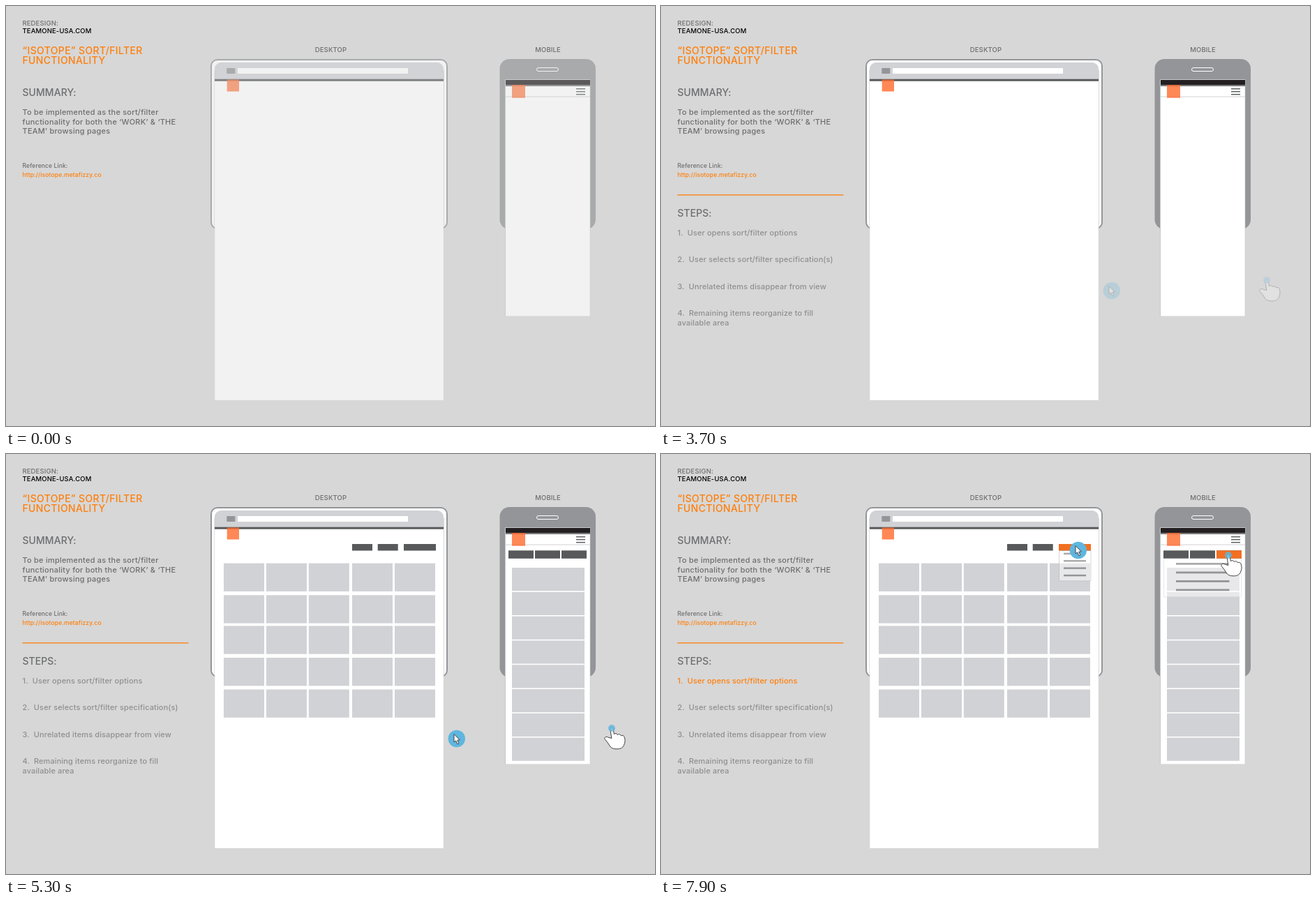
Animation, 930 px wide and 602 px high, one loop 8 s. Source, as an HTML page with a canvas:

```html
<!DOCTYPE html>
<html lang="en">
<head>
<meta charset="utf-8">
<title>Sort/filter functionality</title>
<style>
  html, body { margin: 0; width: 100%; height: 100%; overflow: hidden; background: #d7d7d7; }
  canvas, svg { position: absolute; left: 0; top: 0; width: 930px; height: 602px; }
  text { font: 500 11px Inter, sans-serif; fill: #6d6e70; white-space: pre; }
  .label { font-size: 9.5px; letter-spacing: .12px; }
  .head { font-size: 14px; letter-spacing: .05px; }
  .title { letter-spacing: .35px; }
  .body { letter-spacing: .22px; }
  .link { font-size: 8.6px; letter-spacing: .08px; }
  .orange { fill: #ff7f0a; }
  .black { fill: #000; }
  .mid { text-anchor: middle; }
  #steps text { fill: #8f8f90; letter-spacing: .12px; }
</style>
</head>
<body>
<canvas id="stage" width="930" height="602"></canvas>
<svg viewBox="0 0 930 602">
  <text class="label" x="23.5" y="28.3">REDESIGN:</text>
  <text class="label black" x="23.5" y="39">TEAMONE-USA.COM</text>
  <text class="head title orange" x="23.5" y="69">“ISOTOPE” SORT/FILTER</text>
  <text class="head title orange" x="23.5" y="82.7">FUNCTIONALITY</text>
  <text class="head" x="23.5" y="128.7">SUMMARY:</text>
  <text class="body" x="23.5" y="155.8">To be implemented as the sort/filter</text>
  <text class="body" x="23.5" y="169.5">functionality for both the ‘WORK’ &amp; ‘THE</text>
  <text class="body" x="23.5" y="183.2">TEAM’ browsing pages</text>
  <text class="link" x="23.5" y="231.5">Reference Link:</text>
  <text class="link orange" x="23.5" y="245">http://isotope.metafizzy.co</text>
  <text class="label mid" x="465.5" y="66">DESKTOP</text>
  <text class="label mid" x="776.5" y="66">MOBILE</text>
  <text class="head" id="stepsHead" x="23.5" y="301.7">STEPS:</text>
  <g id="steps">
    <text id="stepOne" x="23.5" y="329">1.  User opens sort/filter options</text>
    <text x="23.5" y="367.3">2.  User selects sort/filter specification(s)</text>
    <text x="23.5" y="406">3.  Unrelated items disappear from view</text>
    <text x="23.5" y="444.2">4.  Remaining items reorganize to fill</text>
    <text x="23.5" y="457.7">available area</text>
  </g>
</svg>
<script>
const W = 930, H = 602, LOOP = 8000;
const GREY = '#939598', LIGHT = '#d1d2d6', DARK = '#58595b', BLUE = '#5fb6de', ORANGE = '#f36f21';
const ctx = document.getElementById('stage').getContext('2d');
const byId = id => document.getElementById(id);

function layer(draw) {
  const canvas = document.createElement('canvas');
  canvas.width = W;
  canvas.height = H;
  draw(canvas.getContext('2d'));
  return canvas;
}

function box(c, color, x, y, w, h) {
  c.fillStyle = color;
  c.fillRect(x, y, w, h);
}

function rounded(c, x, y, w, h, r, fill, stroke, width = 1) {
  c.beginPath();
  c.roundRect(x, y, w, h, r);
  if (fill) { c.fillStyle = fill; c.fill(); }
  if (stroke) { c.strokeStyle = stroke; c.lineWidth = width; c.stroke(); }
}

function outlined(c, path) {
  const shape = new Path2D(path);
  c.lineJoin = 'round';
  c.lineWidth = 1;
  c.fillStyle = '#fff';
  c.strokeStyle = '#414042';
  c.fill(shape);
  c.stroke(shape);
}

function disc(c, x, y, r) {
  c.fillStyle = BLUE;
  c.beginPath();
  c.arc(x, y, r, 0, Math.PI * 2);
  c.fill();
}

const devices = layer(c => {
  const logo = 'rgba(255,107,45,.8)';

  rounded(c, 294, 77, 338, 242, 9, '#fff', GREY, 2);
  rounded(c, 299, 81, 328, 25, [9, 9, 0, 0], LIGHT);
  box(c, '#c7c8ca', 298.5, 92, .7, 227);
  box(c, '#c7c8ca', 627, 92, .7, 227);
  box(c, '#fff', 299.3, 107, 327.5, 458);
  box(c, DARK, 299, 104.7, 328, 3);
  box(c, GREY, 316.3, 89, 12, 8);
  box(c, '#fff', 332, 89, 244, 8);
  box(c, logo, 316.7, 105.5, 17.3, 17);

  rounded(c, 707.5, 76, 137.5, 244, 14, GREY);
  rounded(c, 760.5, 88.5, 31, 5, 2.5, null, '#fff');
  box(c, '#c7c8ca', 715, 105, 122.3, 339.8);
  box(c, '#fff', 716, 106, 120.7, 338.5);
  box(c, '#231f20', 716, 106, 121, 7.3);
  box(c, '#6d6e71', 716, 113.3, 121, 1.7);
  box(c, LIGHT, 716, 129.5, 121, 1);
  box(c, logo, 725, 113, 19, 18.7);
  for (let i = 0; i < 3; i++) box(c, DARK, 817, 118 + i * 4, 13, 1.4);
});

const filters = layer(c => {
  for (const [x, w] of [[496, 29], [532.7, 29], [570, 46]]) box(c, DARK, x, 129, w, 9.5);
  for (let i = 0; i < 3; i++) box(c, DARK, 720 + i * 38, 138.3, 36, 11.5);
});

const activeFilter = layer(c => {
  box(c, ORANGE, 570, 129, 46, 9.5);
  box(c, ORANGE, 796, 138.3, 36, 11.5);
});

const tiles = layer(c => {
  for (const y of [156.6, 202.3, 246.4, 292, 337.5])
    for (const x of [312, 373, 433.8, 496, 557]) box(c, LIGHT, x, y, 58, 40.3);
  for (let i = 0; i < 8; i++) box(c, LIGHT, 725, 163 + i * 34.8, 104, 33.2);
});

const menus = layer(c => {
  rounded(c, 570.5, 138.5, 45.5, 43.5, 0, '#fff', '#b1b3b6');
  rounded(c, 720.5, 150, 111, 55, 0, '#fff', LIGHT);
  for (let i = 0; i < 4; i++) {
    box(c, DARK, 577, 141.6 + i * 10.4, 32, 2.5);
    box(c, DARK, 738, 156 + i * 12.5, 76.5, 2.8);
  }
});

const mouse = layer(c => {
  disc(c, 645.8, 408, 12.2);
  outlined(c, 'M642 401.5V413L644.7 410.9L646.9 415.8L648.9 414.9L646.8 410.2L650.3 409.9Z');
});

const hand = layer(c => {
  outlined(c, `M867.8 407.5L865.8 394.5C865.5 391.2 869.6 390.7 870.1 394L871.4 401.6
    C873 400 875.8 400.4 876.2 402.6C878 401 880.8 401.8 881.2 403.8
    C883.2 402.6 885.6 403.6 886 405.6C887.4 409 887.6 413 885.4 417.4
    C884 421.5 879.5 423 875 422.8C870 423 866.5 421 865 418
    C863 414.5 860.5 411.5 858 408.6C857 406 860.6 404.4 862.6 406Z`);
  c.globalAlpha = .8;
  disc(c, 868, 393, 5);
});

// Stepped ramp to 1: the first step lands exactly at `start`.
function ramp(t, start, count, from = 0, gap = 100) {
  if (t < start) return 0;
  const step = Math.min(count, Math.floor((t - start) / gap) + 1);
  return from + (1 - from) * step / count;
}

function show(image, alpha, x = 0, y = 0) {
  ctx.globalAlpha = alpha;
  ctx.drawImage(image, x, y);
}

function mix(a, b, k) {
  return `rgb(${a.map((v, i) => Math.round(v + (b[i] - v) * k))})`;
}

function render(t) {
  ctx.globalAlpha = 1;
  box(ctx, '#d7d7d7', 0, 0, W, H);
  ctx.globalAlpha = ramp(t, 500, 4);
  box(ctx, '#ff7f0a', 23.5, 270.2, 238, 1.3);

  const active = ramp(t, 7000, 4);
  show(devices, .68 + .32 * ramp(t, 2900, 4));
  show(filters, ramp(t, 4500, 4));
  show(tiles, ramp(t, 5100, 2, 0, 200));
  show(activeFilter, active);
  show(menus, ramp(t, 7800, 4));

  const pointer = ramp(t, 3700, 4), travel = ramp(t, 6300, 6);
  show(mouse, pointer, -48 * travel, -270 * travel);
  show(hand, pointer, -55 * travel, -248 * travel);

  byId('stepsHead').style.opacity = ramp(t, 1300, 4);
  byId('steps').style.opacity = ramp(t, 2200, 3, .25);
  byId('stepOne').style.fill = mix([143, 143, 144], [255, 127, 10], active);
}

const begin = performance.now();
function tick() {
  render((performance.now() - begin) % LOOP);
  requestAnimationFrame(tick);
}
tick();
</script>
</body>
</html>
```
